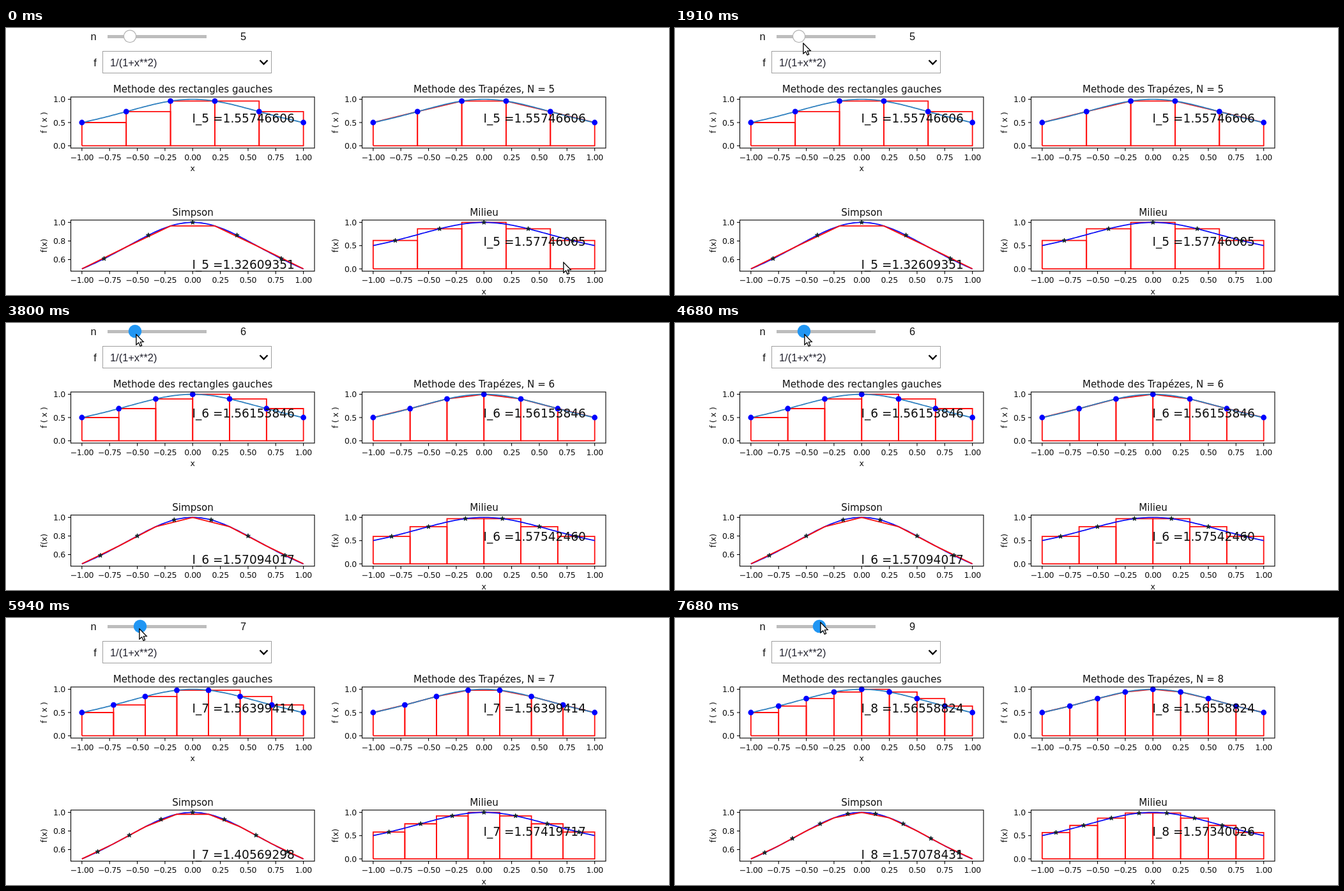
An HTML page with a canvas that plays this animation: 1038 px wide and 418 px high, repeating every 8000 ms.

```html
<!DOCTYPE html>
<html lang="fr">
<head>
<meta charset="utf-8">
<style>
html, body { margin: 0; width: 100%; height: 100%; overflow: hidden; background: #fff; }
canvas { display: block; }
</style>
</head>
<body>
<canvas id="stage" width="1038" height="418"></canvas>
<script>
const ctx = document.getElementById('stage').getContext('2d');
const LOOP = 8000, W = 381.5, H = 80, LEFT = 101.5, RIGHT = 557.5, UPPER = 108, LOWER = 300.7;
const RED = '#ff0d0d', BLUE = '#0c0cf5', STEEL = '#2f80bf';
const PLOT_FONT = '"DejaVu Sans", sans-serif';
const UI_FONT = '16.4px "Liberation Sans", Arial, sans-serif';

// Pointer moves: start, end, number of discrete steps, target x, y
const moves = [
  [230, 620, 6, 570, 297], [830, 1070, 4, 238, 119],
  [1370, 1910, 8, 201, 24], [1990, 2240, 4, 198, 31],
  [2390, 2780, 6, 196, 18], [3170, 3250, 2, 202, 18],
  [3570, 3800, 3, 204, 18], [4220, 4910, 10, 203, 18],
  [5080, 5390, 5, 209, 17], [6420, 6730, 5, 212, 9],
  [6900, 6901, 1, 215, 7], [6980, 7360, 6, 224, 7],
  [7530, 7680, 3, 228, 7]
];
const presses = [[3090, 3400], [4700, 5760], [6650, 7360]];
const sliderChanges = [[3250, 6], [5240, 7], [7060, 8], [7360, 9]];
const plotChanges = [[3570, 6], [5940, 7], [7530, 8]];

const f = x => 1 / (1 + x * x);
const range = (count, fn) => Array.from({ length: count }, (_, i) => fn(i));
const sum = values => values.reduce((a, b) => a + b, 0);
const valueAt = (changes, t) => changes.reduce((v, [at, next]) => t >= at ? next : v, 5);
const curve = range(101, i => -1 + i / 50).map(x => [x, f(x)]);

function pointerAt(t) {
  let x = 873, y = 367;
  for (const [start, end, steps, tx, ty] of moves) {
    if (t < start) break;
    const k = Math.min(1, (Math.floor((t - start) * (steps - 1) / (end - start)) + 1) / steps);
    const ease = k * k * (3 - 2 * k);
    x += (tx - x) * ease;
    y += (ty - y) * ease;
  }
  return [Math.round(x), Math.round(y)];
}

function text(str, x, y, font, align = 'center', color = '#111') {
  ctx.font = font;
  ctx.textAlign = align;
  ctx.fillStyle = color;
  ctx.fillText(str, x, y);
}

function path(points, color, width, close) {
  ctx.beginPath();
  points.forEach(([x, y]) => ctx.lineTo(x, y));
  if (close) ctx.closePath();
  ctx.strokeStyle = color;
  ctx.lineWidth = width;
  ctx.stroke();
}

function disc(x, y, r, color) {
  ctx.beginPath();
  ctx.arc(x, y, r, 0, 7);
  ctx.fillStyle = color;
  ctx.fill();
}

function star(x, y) {
  path(range(10, i => {
    const a = i * Math.PI / 5, r = i % 2 ? 1.5 : 3.7;
    return [x + r * Math.sin(a), y - r * Math.cos(a)];
  }), '#14262b', 0.9, true);
  ctx.fillStyle = '#14262b';
  ctx.fill();
}

// Draws axes and returns helpers working in data coordinates
function axes(left, top, title, yLabel, xLabel, low, high, yTicks) {
  const pad = (high - low) / 20, bottom = top + H;
  const px = x => left + W / 2 + x * W / 2.2;
  const py = y => bottom - (y - low + pad) * H / (high - low + 2 * pad);
  const small = '12.5px ' + PLOT_FONT;
  ctx.letterSpacing = '-0.4px';
  for (let i = -4; i <= 4; i++) {
    const x = px(i / 4);
    path([[x, bottom], [x, bottom + 4.5]], '#000', 1.1);
    text((i / 4).toFixed(2).replace('-', '−'), x, bottom + 18.5, small);
  }
  for (const v of yTicks) {
    path([[left - 4.5, py(v)], [left, py(v)]], '#000', 1.1);
    text(v.toFixed(1), left - 8.8, py(v) + 4.6, small, 'right');
  }
  ctx.letterSpacing = '0px';
  text(title, left + W / 2 + 0.3, top - 6.9, '15.1px ' + PLOT_FONT);
  if (xLabel) text(xLabel, left + W / 2, bottom + 36.3, small);
  ctx.save();
  ctx.translate(left - 37.5, top + H / 2);
  ctx.rotate(-Math.PI / 2);
  text(yLabel, 0, 0, small);
  ctx.restore();
  const place = ([x, y]) => [px(x), py(y)];
  return {
    line: (points, color) => path(points.map(place), color, 1.8),
    dots: points => points.map(place).forEach(([x, y]) => disc(x, y, 4.4, '#0000ff')),
    stars: points => points.map(place).forEach(([x, y]) => star(x, y)),
    finish(n, integral) {
      ctx.strokeStyle = '#000';
      ctx.lineWidth = 1.1;
      ctx.strokeRect(left, top, W, H);
      text(`I_${n} =${integral.toFixed(8)}`, px(0) - 0.8, py(0.5), '18.6px ' + PLOT_FONT, 'left');
    }
  };
}

function drawPlots(n) {
  const h = 2 / n;
  const nodes = range(n + 1, i => -1 + i * h).map(x => [x, f(x)]);
  const mids = range(n, i => -1 + (i + 0.5) * h).map(x => [x, f(x)]);
  const unit = [0, 0.5, 1];
  const ys = nodes.map(p => p[1]);
  const boxes = (ax, heights) => range(n, i => {
    const a = nodes[i][0], b = nodes[i + 1][0], [ya, yb] = heights(i);
    ax.line([[a, 0], [a, ya], [b, yb], [b, 0], [a, 0]], RED);
  });

  const rect = axes(LEFT, UPPER, 'Methode des rectangles gauches', 'f ( x )', 'x', 0, 1, unit);
  boxes(rect, i => [ys[i], ys[i]]);
  rect.line(curve, STEEL);
  rect.dots(nodes);
  rect.finish(n, h * sum(ys.slice(0, n)));

  const trap = axes(RIGHT, UPPER, 'Methode des Trapézes, N = ' + n, 'f ( x )', '', 0, 1, unit);
  boxes(trap, i => [ys[i], ys[i + 1]]);
  trap.line(curve, STEEL);
  trap.dots(nodes);
  trap.finish(n, h * sum(range(n, i => (ys[i] + ys[i + 1]) / 2)));

  const simpson = axes(LEFT, LOWER, 'Simpson', 'f(x)', '', 0.5, 1, [0.6, 0.8, 1]);
  simpson.line(curve, BLUE);
  simpson.line(nodes, RED);
  simpson.stars(mids);
  simpson.finish(n, h / 3 * sum(range(n >> 1, i => ys[2 * i] + 4 * ys[2 * i + 1] + ys[2 * i + 2])));

  const middle = axes(RIGHT, LOWER, 'Milieu', 'f(x)', 'x', 0, 1, unit);
  boxes(middle, i => [mids[i][1], mids[i][1]]);
  middle.line(curve, BLUE);
  middle.stars(mids);
  middle.finish(n, h * sum(mids.map(p => p[1])));
}

function drawControls(n, [mx, my]) {
  text('n', 137, 18.5, UI_FONT);
  text('f', 139.5, 60, UI_FONT);
  text(n, 371.5, 19, UI_FONT);
  ctx.fillStyle = '#bdbdbd';
  ctx.fillRect(159, 11, 155, 5);
  const knob = 154 + 8 * n;
  if (Math.hypot(mx - knob, my - 13) < 10.5) {
    disc(knob, 13, 10.3, '#2196f3');
  } else {
    disc(knob, 13, 10.2, '#b4b4b4');
    disc(knob, 13, 9, '#fff');
  }
  ctx.strokeStyle = '#9e9e9e';
  ctx.lineWidth = 1;
  ctx.strokeRect(151.5, 36.5, 264, 34);
  text('1/(1+x**2)', 163, 60, UI_FONT, 'left', '#22222e');
  path([[397.5, 50.5], [403.5, 56.5], [409.5, 50.5]], '#000', 2.4);
}

function drawPointer([x, y], pressed) {
  if (pressed) disc(x, y, 12, 'rgba(255, 238, 50, .5)');
  const arrow = [[0, 0], [0, 16], [3.7, 12.6], [6.2, 18.2], [8.6, 17.2], [6.2, 11.7], [11.2, 11.5]];
  path(arrow.map(([dx, dy]) => [x + dx, y + dy]), '#000', 1.1, true);
  ctx.fillStyle = '#fff';
  ctx.fill();
  ctx.stroke();
}

function draw() {
  const t = performance.now() % LOOP;
  const pointer = pointerAt(t);
  ctx.fillStyle = '#fff';
  ctx.fillRect(0, 0, 1038, 418);
  drawControls(valueAt(sliderChanges, t), pointer);
  drawPlots(valueAt(plotChanges, t));
  drawPointer(pointer, presses.some(([a, b]) => t >= a && t < b));
  requestAnimationFrame(draw);
}
draw();
</script>
</body>
</html>
```
